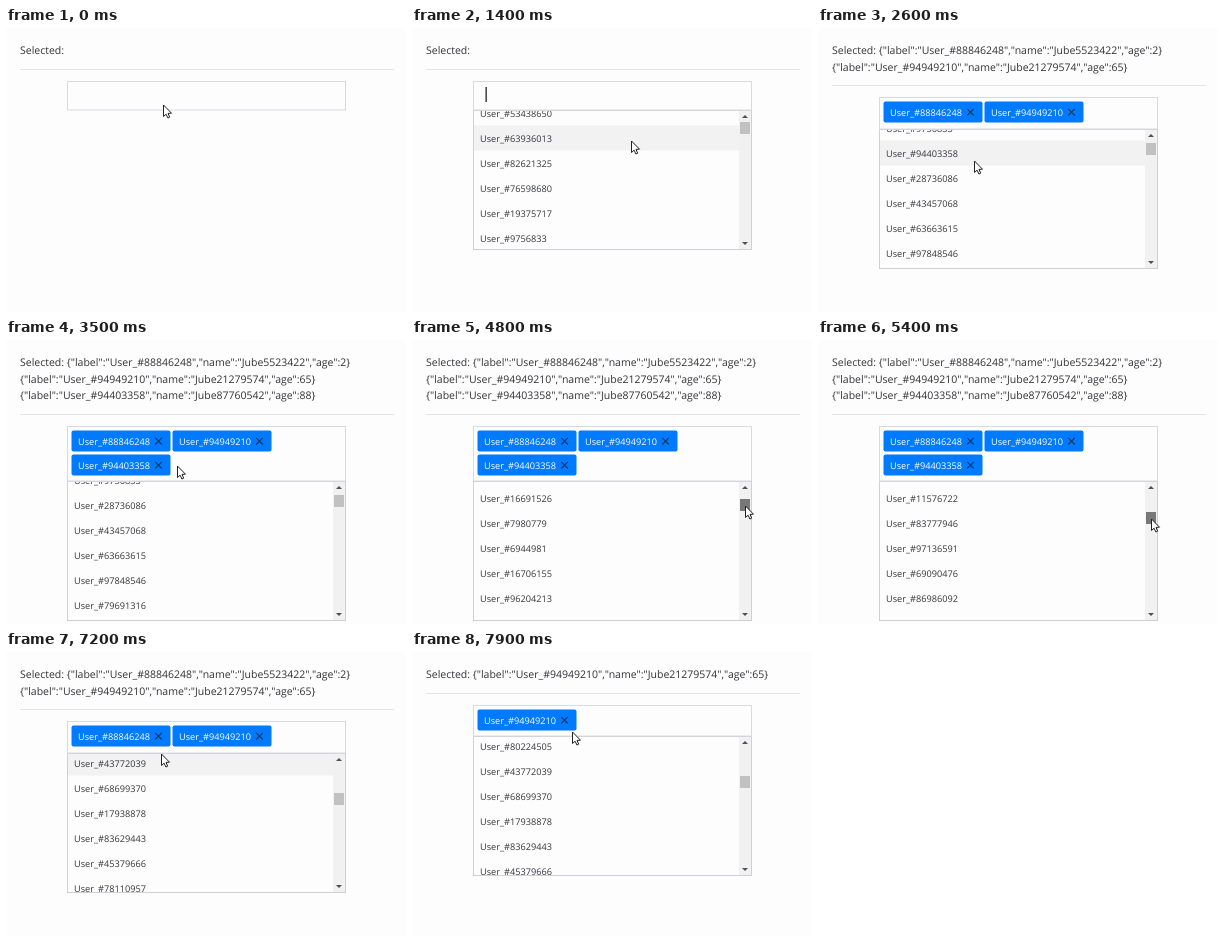
These frames come from a looping animation (400x284 px, 8000 ms). An HTML page with a canvas:

```html
<!DOCTYPE html>
<html lang="en">
<head>
<meta charset="utf-8">
<title>Multi-select dropdown</title>
<style>
  html, body { margin: 0; width: 100%; height: 100%; overflow: hidden; background: #fefdfe; }
  canvas { display: block; }
</style>
</head>
<body>
<canvas id="stage" width="400" height="284"></canvas>
<script>
const ctx = document.getElementById('stage').getContext('2d');
const LOOP = 8000, STEP = 100;
const ROW = 25, LIST_HEIGHT = 140, ROW_COUNT = 440;
const LEFT = 61.5, RIGHT = 339.5, BAR = 327;
const SCROLL_PER_PIXEL = 100;
const FONT = '"Open Sans", "Noto Sans", sans-serif';

// Layout by number of selected users
const BOX_TOP = [53, 53, 69, 86];
const LIST_TOP = [82, 84, 101, 141];

const users = [
  { row: 9, age: 2, from: 2200, to: 7500 },
  { row: 10, age: 65, from: 2600, to: LOOP },
  { row: 8, age: 88, from: 3400, to: 6900 },
];

// [time, x, y]
const pointerPath = [
  [0, 157, 77], [700, 157, 77], [1300, 219, 113], [1600, 219, 113],
  [2100, 156, 133], [2600, 156, 133], [3000, 165, 130], [3400, 167, 128],
  [3500, 171, 126], [4300, 333, 162], [4400, 333, 162], [4800, 333, 166],
  [5800, 333, 188], [6500, 155, 135], [6900, 154, 131], [7300, 155, 92],
  [7500, 155, 91], [7900, 160, 80],
];
// [time, scroll offset]
const scrollPath = [
  [0, 0], [1300, 0], [1400, 71], [1500, 165], [1600, 200],
  [4400, 200], [4800, 607], [5800, 2814],
];
const DRAG_START = 4400, DRAG_END = 5800;

const SHORT = new Set([7, 28, 29, 120, 1009]);

function idNumber(seed) {
  const wave = Math.sin(seed * 12.9898 + 4) * 43758.5453;
  const id = Math.floor((wave - Math.floor(wave)) * 9e7) + 1e7;
  return SHORT.has(seed) ? Math.floor(id / 10) : id;
}
const label = row => 'User_#' + idNumber(row);
const describe = ({ row, age }) =>
  JSON.stringify({ label: label(row), name: 'Jube' + idNumber(1000 + row), age });

function along(path, t) {
  const next = path.findIndex(key => key[0] > t);
  if (next < 0) return path[path.length - 1].slice(1);
  const a = path[next - 1], b = path[next];
  const k = (t - a[0]) / (b[0] - a[0]);
  return a.slice(1).map((v, i) => v + (b[i + 1] - v) * k);
}

function rect(x, y, w, h, color) {
  ctx.fillStyle = color;
  ctx.fillRect(x, y, w, h);
}
function text(str, x, y, size, color) {
  ctx.font = `${size}px ${FONT}`;
  ctx.fillStyle = color;
  ctx.fillText(str, x, y);
}
function polygon(points, fill, stroke) {
  ctx.beginPath();
  points.forEach(([x, y]) => ctx.lineTo(x, y));
  ctx.closePath();
  ctx.fillStyle = fill;
  ctx.fill();
  if (stroke) {
    ctx.strokeStyle = stroke;
    ctx.stroke();
  }
}
function frame(x, y, w, h, color) {
  ctx.lineWidth = 1;
  ctx.strokeStyle = color;
  ctx.strokeRect(x, y, w, h);
}

function drawHeader(selected) {
  const lines = selected.length ? selected.map(describe) : [''];
  lines[0] = 'Selected: ' + lines[0];
  lines.forEach((line, i) => text(line, 14, 26 + 16.7 * i, 10.5, '#303236'));
  rect(14, Math.round(41 + 16.4 * (lines.length - 1)), 374, 1, '#e4e4e6');
}

const tagPosition = (i, boxTop) =>
  [65.5 + (i % 2) * 101, boxTop + 4.5 + Math.floor(i / 2) * 24];

function drawTag(user, i, boxTop) {
  const [x, y] = tagPosition(i, boxTop);
  ctx.fillStyle = '#007bff';
  ctx.beginPath();
  ctx.roundRect(x, y, 99, 21, 2);
  ctx.fill();
  text(label(user.row), x + 6.5, y + 14, 9.2, '#fff');
  const cx = x + 87, cy = y + 10.7, r = 3.3;
  ctx.strokeStyle = '#12365c';
  ctx.lineWidth = 1.1;
  ctx.beginPath();
  ctx.moveTo(cx - r, cy - r);
  ctx.lineTo(cx + r, cy + r);
  ctx.moveTo(cx + r, cy - r);
  ctx.lineTo(cx - r, cy + r);
  ctx.stroke();
}

function drawScrollbar(top, scroll, px, py, dragging) {
  rect(BAR, top, RIGHT - BAR, LIST_HEIGHT, '#f1f1f1');
  const thumb = Math.round(top + 11.5 + scroll / SCROLL_PER_PIXEL);
  const hovered = px >= BAR && px < RIGHT && py >= thumb && py < thumb + 12;
  rect(BAR + 1, thumb, 10, 12, dragging ? '#787878' : hovered ? '#a8a8a8' : '#c1c1c1');
  const x = 333, up = top + 5, down = top + LIST_HEIGHT - 5;
  polygon([[x - 3, up + 3], [x, up], [x + 3, up + 3]], '#505050');
  polygon([[x - 3, down - 3], [x, down], [x + 3, down - 3]], '#505050');
}

function drawList(top, scroll, hidden, px, py, dragging) {
  ctx.save();
  ctx.beginPath();
  ctx.rect(LEFT, top, RIGHT - LEFT, LIST_HEIGHT);
  ctx.clip();
  let position = 0;
  for (let row = 0; row < ROW_COUNT; row++) {
    if (hidden.has(row)) continue;
    const middle = top + 24 + ROW * position++ - scroll;
    if (middle < top - ROW || middle > top + LIST_HEIGHT + ROW) continue;
    const hovered = !dragging && px > LEFT && px < BAR && py > top &&
      py < top + LIST_HEIGHT && Math.abs(py - middle) < ROW / 2;
    if (hovered) rect(LEFT, middle - ROW / 2, BAR - LEFT, ROW, '#f2f2f3');
    text(label(row), 68, middle + 3.5, 9.2, '#34363a');
  }
  drawScrollbar(top, scroll, px, py, dragging);
  ctx.restore();
  frame(LEFT, top + 0.5, RIGHT - LEFT, LIST_HEIGHT - 1, '#cfcfd6');
}

function drawArrow(x, y) {
  ctx.save();
  ctx.translate(x + 0.5, y);
  ctx.lineWidth = 1;
  polygon([[0, 0], [0, 11.5], [2.6, 9.2], [4.4, 13], [6.2, 12.2], [4.5, 8.4], [8, 8.2]],
    '#fff', '#222');
  ctx.restore();
}

function drawHand(x, y) {
  ctx.save();
  ctx.translate(x - 1, y);
  ctx.lineWidth = 1;
  polygon([[-1, 0.5], [0, -0.5], [1, 0.5], [1, 5], [3.5, 5.2], [6, 6], [7.5, 7.2], [7.5, 11],
    [6, 15.5], [-1, 15.5], [-2.5, 12.5], [-5, 9], [-4, 7.8], [-1, 10]], '#fff', '#222');
  ctx.beginPath();
  for (const fx of [1.2, 3.4, 5.6]) {
    ctx.moveTo(fx, 5.5);
    ctx.lineTo(fx, 8.5);
  }
  ctx.stroke();
  ctx.restore();
}

function draw(t) {
  const selected = users.filter(u => t >= u.from && t < u.to);
  const count = selected.length;
  const boxTop = BOX_TOP[count], listTop = LIST_TOP[count];
  const [x, y] = along(pointerPath, t).map(Math.round);
  const [scroll] = along(scrollPath, t);
  const dragging = t >= DRAG_START && t < DRAG_END;

  rect(0, 0, 400, 284, '#fefdfe');
  drawHeader(selected);
  if (t >= 200) drawList(listTop, scroll, new Set(selected.map(u => u.row)), x, y, dragging);
  frame(LEFT, boxTop + 0.5, RIGHT - LEFT, listTop - boxTop - 0.5, '#d9d9e0');
  selected.forEach((user, i) => drawTag(user, i, boxTop));

  const caretOn = t >= 300 && t < 1800 && Math.floor((t - 300) / 500) % 2 === 0;
  if (caretOn) rect(73.5, 59, 1.3, 15, '#222');

  const overRemove = selected.some((_, i) => {
    const [tagX, tagY] = tagPosition(i, boxTop);
    return x > tagX + 80 && x < tagX + 99 && y > tagY && y < tagY + 21;
  });
  (overRemove ? drawHand : drawArrow)(x, y);
}

ctx.textRendering = 'geometricPrecision';
const start = performance.now();
function tick() {
  const t = (performance.now() - start) % LOOP;
  draw(Math.floor(t / STEP) * STEP);
  requestAnimationFrame(tick);
}
tick();
</script>
</body>
</html>
```
